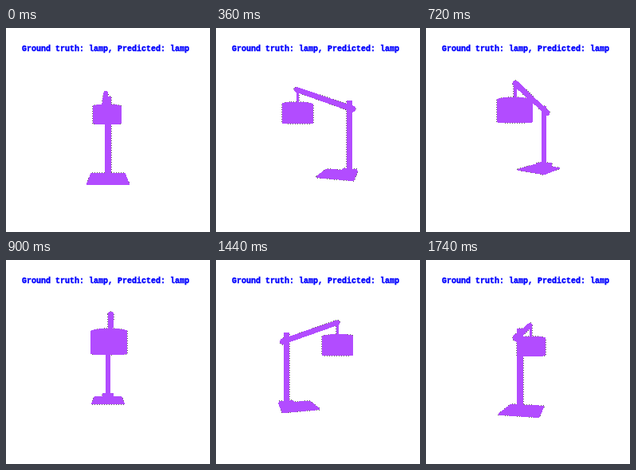
These frames come from a looping animation (256 px wide and 256 px high, 1.8 s). An HTML page:

```html
<!DOCTYPE html>
<html lang="en">
<head>
<meta charset="utf-8">
<title>Rotating lamp</title>
<style>
  html, body { margin: 0; width: 100%; height: 100%; overflow: hidden; background: #fff; }
  svg { display: block; width: 100%; height: 100%; }
  text { font: bold 10px "Liberation Mono", monospace; fill: #00f; stroke: #00f; stroke-width: .4; white-space: pre; }
  path { shape-rendering: crispEdges; }
  #edge { fill: none; stroke: #222; stroke-width: .7; stroke-dasharray: 1 2; }
  #body { fill: #b24cff; }
</style>
</head>
<body>
<svg viewBox="0 0 256 256">
  <text x="20" y="29">Ground truth: lamp, Predicted: lamp</text>
  <path id="edge"/>
  <path id="body"/>
</svg>
<script>
const STEP = 60, STEPS = 30, CENTER = 128, DIST = 221.7;
const edge = document.getElementById('edge'), body = document.getElementById('body');

// Points are [u, v, y, r]: u along the arm, v across it, y downwards, r an optional ball radius.
const box = (u0, u1, v, y0, y1) =>
  [u0, u1].flatMap(u => [-v, v].flatMap(w => [[u, w, y0], [u, w, y1]]));

const cylinder = (u, v, r, y0, y1) =>
  Array.from({ length: 32 }, (_, i) => i * Math.PI / 16).flatMap(a => {
    const pu = u + r * Math.cos(a), pv = v + r * Math.sin(a);
    return [[pu, pv, y0], [pu, pv, y1]];
  });

const parts = [
  box(4.7, 46.7, 21, 52.6, 54.2),               // base
  box(30.3, 47, 8.5, 47.5, 53),                 // foot
  cylinder(38.9, 0, 3.3, -34.3, 50),            // pole
  [[-28, -3, -52, 3.4], [43, -3, -24.5, 3.4]],  // arm
  [[43, -3, -24.5, 3.8], [38, -3, -26.5, 3.8]], // joint
  cylinder(-27, -1.6, 1.6, -51, -30),           // rod
  cylinder(-27, -1.2, 20.2, -33.3, -8.7)        // shade
];

function project([u, v, y, r], sin, cos) {
  const scale = DIST / (DIST - u * cos + v * sin);
  const px = CENTER + scale * (u * sin + v * cos), py = CENTER + scale * y;
  if (!r) return [[px, py]];
  return Array.from({ length: 16 }, (_, i) => {
    const a = i * Math.PI / 8;
    return [px + r * scale * Math.cos(a), py + r * scale * Math.sin(a)];
  });
}

function hull(points) {
  points.sort((a, b) => a[0] - b[0] || a[1] - b[1]);
  const cross = (o, a, b) => (a[0] - o[0]) * (b[1] - o[1]) - (a[1] - o[1]) * (b[0] - o[0]);
  const chain = list => {
    const out = [];
    for (const p of list) {
      while (out.length > 1 && cross(out.at(-2), out.at(-1), p) <= 0) out.pop();
      out.push(p);
    }
    return out.slice(0, -1);
  };
  return [...chain(points), ...chain([...points].reverse())];
}

function draw(now) {
  const angle = Math.floor(now / STEP) % STEPS * 2 * Math.PI / STEPS;
  const sin = Math.sin(angle), cos = Math.cos(angle);
  const d = parts.map(part => {
    const outline = hull(part.flatMap(p => project(p, sin, cos)));
    return 'M' + outline.map(p => p.map(n => n.toFixed(2))).join('L') + 'Z';
  }).join('');
  edge.setAttribute('d', d);
  body.setAttribute('d', d);
}

function tick() {
  draw(performance.now());
  requestAnimationFrame(tick);
}
tick();
</script>
</body>
</html>
```
